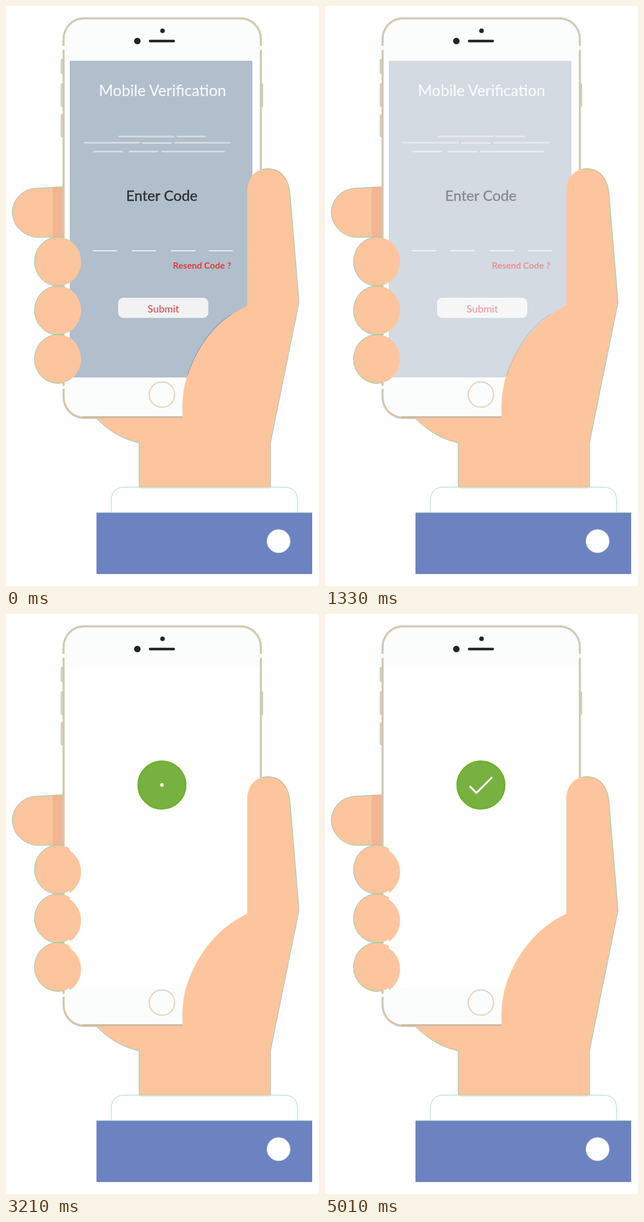
These frames come from a looping animation (550x1018 px, 5.13 s). An HTML page:

```html
<!DOCTYPE html>
<html lang="en">
<head>
<meta charset="utf-8">
<title>Mobile Verification</title>
<style>
  html, body { margin: 0; width: 100%; height: 100%; overflow: hidden; background: #fff; }
  svg { display: block; width: 550px; height: 1018px; }
  text { font-family: Lato, "Open Sans", sans-serif; }
  .mid { text-anchor: middle; }
  .skin { fill: #fdc59d; }
  .edge { fill: none; stroke: #86cdb0; stroke-width: 1; }
  .tan { fill: #e3cdb9; stroke: #a9d3bd; stroke-width: .7; }
  #submit { transform-box: fill-box; transform-origin: center; }
</style>
</head>
<body>
<svg viewBox="0 0 550 1018">
  <defs>
    <clipPath id="leftPart"><rect width="112" height="1018"/></clipPath>
    <clipPath id="rightPart"><rect x="112" width="60" height="1018"/></clipPath>
    <clipPath id="outer"><rect width="101" height="1018"/></clipPath>
    <g id="fingers">
      <ellipse cx="91" cy="448.5" rx="41" ry="43"/>
      <ellipse cx="91" cy="534" rx="41" ry="43"/>
      <ellipse cx="91" cy="619.5" rx="41" ry="43"/>
    </g>
  </defs>

  <!-- index finger -->
  <path class="skin" stroke="#86cdb0" d="M102 317L50 320C25 323 11 343 11 362C11 383 28 403 52 406H102Z"/>
  <path fill="#f2b592" d="M82 318L102 317V406H82Z"/>

  <!-- phone -->
  <g class="tan">
    <rect x="96.5" y="93" width="6" height="26" rx="2"/>
    <rect x="96.5" y="136" width="6" height="41" rx="2"/>
    <rect x="96.5" y="190" width="6" height="40" rx="2"/>
    <rect x="446" y="136" width="5.5" height="41" rx="2"/>
  </g>
  <rect x="99.8" y="20.3" width="349.4" height="704" rx="37" fill="#dcc6af" stroke="#a9d3bd" stroke-width=".8"/>
  <rect x="103" y="23.5" width="343" height="697" rx="34" fill="#fbfdfc"/>
  <path fill="#fff" d="M104 94H445V656H104ZM99 70h5v7h-5zM445 70h5v7h-5zM99 667h5v5h-5z"/>
  <g fill="#242424">
    <circle cx="230.8" cy="61.5" r="5.7"/>
    <circle cx="275" cy="43.5" r="4"/>
    <rect x="251" y="59.3" width="46" height="4.4" rx="2.2"/>
  </g>
  <circle cx="274" cy="682" r="22.3" fill="none" stroke="#e6d5c3" stroke-width="2.4"/>

  <!-- form -->
  <g id="form">
    <rect x="112" y="96" width="321" height="556" rx="1.5" fill="#b1becb"/>
    <text class="mid" x="275" y="158" font-size="27" fill="#f4f7fa" stroke="#f4f7fa" stroke-width=".3">Mobile Verification</text>
    <path stroke="#d5dde4" stroke-width="2.8" stroke-linecap="round" d="M199 229H295M301 229H350M138 240H234M240 240.5H290M297 240H393M155 255.5H204M217 255.5H266M274 255.5H383"/>
    <text class="mid" x="273.8" y="341.5" font-size="25.6" fill="#2e3033" stroke="#2e3033" stroke-width=".4">Enter Code</text>
    <g id="digits" class="mid" font-size="21.5" fill="#3c4045">
      <text x="174" y="408.8">1</text>
      <text x="241.5" y="408.8">2</text>
      <text x="311.5" y="408.8">3</text>
      <text x="377.5" y="408.8">4</text>
    </g>
    <path stroke="#eef1f4" stroke-width="1.8" d="M152.500 429.500H195.500M221 429.500H263.500M290 429.500H333M356 429.500H398.500"/>
    <text class="mid" x="344.500" y="460.500" font-size="15.700" font-weight="700" fill="#dc3a41">Resend Code ?</text>
    <g id="submit">
      <rect x="197" y="512" width="158.500" height="35.500" rx="9" fill="#f2f2f2"/>
      <text class="mid" x="276.500" y="537.500" font-size="18" fill="#dc3a41">Submit</text>
    </g>
  </g>

  <!-- success badge, drawn on a 52 unit square -->
  <g id="badge" fill="none" stroke-miterlimit="10">
    <circle id="fill" cx="26" cy="26" stroke="#77b13f"/>
    <circle id="ring" cx="26" cy="26" r="25" stroke="#73b034" stroke-width="2" stroke-dasharray="166"/>
    <path id="tick" d="M14.1 27.2l7.1 7.2 16.700-16.800" stroke="#fff" stroke-width="2" stroke-dasharray="48"/>
  </g>

  <!-- fingers, palm and wrist -->
  <use href="#fingers" class="skin" clip-path="url(#leftPart)"/>
  <g clip-path="url(#rightPart)"><use id="tips" href="#fingers" class="skin"/></g>
  <g clip-path="url(#outer)"><use href="#fingers" class="edge"/></g>
  <path class="skin" d="M310.500 723.500C308 690 314 660 320 645C338 595 372 551 424 526V322C426 302 436 286 461 285C485 285 497 303 499 328L515 520L465 766V846H234V767C205 760 180 746 159 723.500Z"/>
  <path class="edge" d="M449 287C475 280 497 300 499 328L515 520L465 766V846M234 846V767C205 760 180 746 159 724"/>
  <path stroke="#cdb49c" stroke-width="2.400" d="M135 721.500H310.500"/>
  <path id="crease" fill="none" stroke="#8d8580" stroke-width=".8" d="M319 648C337 597 362 562 396 541"/>

  <!-- sleeve -->
  <path fill="#fff" stroke="#9edcc6" d="M185 889V869Q185 844.500 209 844.500H488Q512.500 844.500 512.500 869V889"/>
  <path stroke="#fbe3d2" stroke-width="2" d="M235 846H464"/>
  <rect x="159" y="889" width="379" height="108" fill="#6d82c1"/>
  <path class="edge" d="M159 889.300H538"/>
  <circle cx="479" cy="939.300" r="20.500" fill="#fff" stroke="#c9cfe4"/>
</svg>

<script>
const LOOP = 5130, TICK = 40, FADE_START = 1330, BADGE_START = 1548;
const BADGE_RATE = 0.0004265;   // badge seconds per millisecond
const DIGIT_START = 140, DIGIT_STEP = 70;
const $ = id => document.getElementById(id);
const digits = [...$("digits").children];
const clamp = v => Math.min(1, Math.max(0, v));

// Cubic easing whose handles lie on the 0 and 1 levels.
function ease(x1, x2) {
  return x => {
    x = clamp(x);
    if (x === 0 || x === 1) return x;
    let lo = 0, hi = 1, u = 0.5;
    for (let i = 0; i < 24; i++) {
      u = (lo + hi) / 2;
      const v = 1 - u;
      if (3 * v * v * u * x1 + 3 * v * u * u * x2 + u ** 3 < x) lo = u; else hi = u;
    }
    return u * u * (3 - 2 * u);
  };
}
const strokeEase = ease(0.65, 0.45);
const inOut = ease(0.42, 0.58);

function drawForm(t) {
  digits.forEach((d, i) => {
    const step = Math.floor((t - DIGIT_START) / DIGIT_STEP) + 1 - i * 3;
    d.setAttribute("opacity", t < FADE_START ? clamp(step / 3) : 0);
  });

  // brief press of the button
  const press = [0.98, 0.96, 0.98][Math.floor((t - 1050) / 70)] || 1;
  $("submit").style.transform = `scale(${press})`;

  const faded = Math.floor((t - FADE_START) / TICK);
  const alpha = t < FADE_START ? 1 : clamp(0.56 * (1 - faded / 5));
  $("form").setAttribute("opacity", alpha);
  $("crease").setAttribute("opacity", alpha);
  $("tips").setAttribute("transform", `translate(0 ${alpha ? 0 : 4})`);
}

function drawBadge(t) {
  const stepped = FADE_START + Math.floor((t - FADE_START) / TICK) * TICK;
  const s = (stepped - BADGE_START) * BADGE_RATE;
  $("badge").style.display = s > 0 ? "" : "none";
  if (s <= 0) return;

  $("ring").setAttribute("stroke-dashoffset", 166 * (1 - strokeEase(s / 0.6)));

  // the disc grows inward from its rim
  const depth = Math.min(26, 27 * inOut((s - 0.4) / 0.4));
  $("fill").setAttribute("r", 26 - depth / 2);
  $("fill").setAttribute("stroke-width", depth);

  const drawn = strokeEase((s - 0.8) / 0.3);
  $("tick").setAttribute("stroke-dashoffset", 48 * (1 - drawn));
  $("tick").style.display = drawn > 0 ? "" : "none";

  const rise = inOut((s - 0.9) / 0.15), fall = inOut((s - 1.05) / 0.15);
  const size = 86 / 52 * (1 + 0.1 * (rise - fall));
  $("badge").setAttribute("transform", `translate(274 300.2) scale(${size}) translate(-26 -26)`);
}

const start = performance.now();
function frame() {
  const t = (performance.now() - start) % LOOP;
  drawForm(t);
  drawBadge(t);
  requestAnimationFrame(frame);
}
frame();
</script>
</body>
</html>
```
